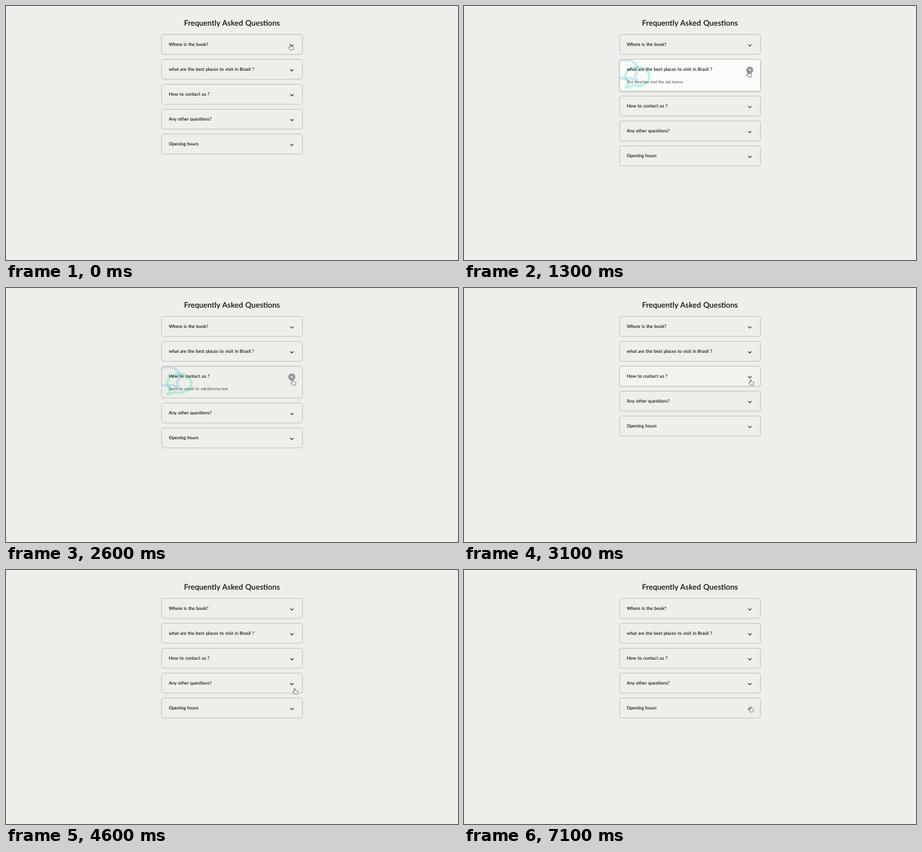
An HTML page that plays this animation: 690 by 388 pixels, repeating every 7.2 s.

```html
<!DOCTYPE html>
<html lang="en">
<head>
<meta charset="utf-8">
<title>Frequently Asked Questions</title>
<style>
  html, body { margin: 0; width: 100%; height: 100%; overflow: hidden; background: #eeefea; }
  svg { display: block; width: 100%; height: 100%; }
  text { font-family: Lato, "Open Sans", sans-serif; text-rendering: geometricPrecision; }
  .title { font-size: 11.7px; font-weight: 600; word-spacing: .6px; text-anchor: middle; fill: #0c0c0c; }
  .question { font-size: 6.95px; font-weight: 600; word-spacing: .35px; fill: #111; }
  .answer { font-size: 6.2px; word-spacing: .3px; fill: #4a4a4a; }
  .line { fill: none; stroke-linecap: round; stroke-linejoin: round; }
</style>
</head>
<body>
<svg id="stage" viewBox="0 0 690 388">
  <rect width="690" height="388" fill="#eeefea"/>
  <text class="title" x="345" y="29.6">Frequently Asked Questions</text>
  <g id="cards"></g>
  <g id="cursor" fill="#fff" stroke="#333" stroke-linejoin="round">
    <path id="arrow" stroke-width=".55" d="M0 0V6.2L1.4 5 2.3 7 3.2 6.6 2.3 4.7H4.2Z"/>
    <path id="hand" stroke-width=".65" d="M-.8 5.2V.8a.8.8 0 0 1 1.6 0V3.3q1.3-.5 1.5.3 1.2-.4 1.4.4 1.1-.2 1.1.8V6.3q0 1.2-.8 2.3H-.4Q-1.2 7.3-2.6 5.7q-.5-1 .5-1.1.7.1 1.3.8Z"/>
  </g>
</svg>
<script>
const LOOP = 7200, STEP = 100;
const LEFT = 237.4, TOP = 43.4, WIDTH = 215.3, PITCH = 38.05;
const CLOSED = 30.5, OPEN = 48.6, FADE_IN = 250, FADE_OUT = 160;

const items = [
  { q: 'Where is the book?', a: 'The book is on the table', open: 100, close: 740 },
  { q: 'what are the best places to visit in Brasil ?', a: 'The beaches and the old towns', open: 1100, close: 1800 },
  { q: 'How to contact us ?', a: 'Send an email to: ask@home.test', open: 2600, close: 3000 },
  { q: 'Any other questions?', a: 'No other questions', open: 4000, close: 4400 },
  { q: 'Opening hours', a: '24hrs', open: 5100, close: 6650 }
];

// Pointer stops: time, x, y, shape; it glides between them.
const stops = [
  [0, 434.2, 58.4, 'hand'], [700, 434.2, 58.4, 'hand'],
  [800, 433, 83.6, 'arrow'], [900, 434.2, 100.2, 'hand'],
  [1900, 434.2, 100.2, 'hand'], [2100, 435.5, 114, 'arrow'],
  [2200, 436.5, 125, 'hand'], [2400, 437.6, 139.8, 'hand'],
  [3100, 437.6, 139.8, 'hand'], [3200, 439.5, 153, 'arrow'],
  [3300, 441, 170, 'hand'], [3400, 441, 170, 'hand'],
  [3500, 441.2, 170.8, 'hand'], [4500, 441.2, 170.8, 'hand'],
  [4700, 440, 191, 'arrow'], [4800, 440, 191, 'arrow'],
  [4900, 438.6, 203, 'hand'], [5000, 438, 207.5, 'hand'],
  [5800, 438, 207.5, 'hand'], [5900, 440.2, 208.2, 'arrow'],
  [6100, 440.8, 208.4, 'arrow'], [6300, 440.8, 208.4, 'arrow'],
  [6400, 439.4, 208.4, 'hand'], [6500, 437.7, 208.3, 'hand'],
  [7000, 437.7, 208.3, 'hand'], [7100, 437.2, 208.3, 'hand'], [7200, 437.2, 208.3, 'hand']
];

const BUBBLE = 'M256 56C128 56 24 138 24 240C24 288 46 328 80 361C66 402 42 438 24 456C86 456 130 430 159 407C188 418 222 424 256 424C384 424 488 342 488 240S384 56 256 56Z';
const BUBBLE_SCALE = 0.0786;

const byId = id => document.getElementById(id);
const clamp = v => Math.min(1, Math.max(0, v));
const smooth = v => v * v * (3 - 2 * v);

function add(parent, tag, attrs, text) {
  const el = document.createElementNS('http://www.w3.org/2000/svg', tag);
  for (const name in attrs) el.setAttribute(name, attrs[name]);
  if (text) el.textContent = text;
  parent.append(el);
  return el;
}

const box = height => ({ x: LEFT, y: 0, width: WIDTH, height, rx: 3.4 });

function addBubble(parent, x, y, flip, color, opacity) {
  add(parent, 'path', {
    class: 'line', d: BUBBLE, stroke: color, 'stroke-width': 48, opacity,
    transform: `translate(${x} ${y}) scale(${flip * BUBBLE_SCALE} ${BUBBLE_SCALE})`
  });
}

function buildCard(item, i) {
  const g = item.group = add(byId('cards'), 'g', {});
  item.fill = add(g, 'rect', { ...box(CLOSED), fill: '#fdfefb' });

  const clip = add(g, 'clipPath', { id: 'clip' + i });
  add(clip, 'rect', box(OPEN));
  item.bubbles = add(g, 'g', { 'clip-path': `url(#clip${i})` });
  addBubble(item.bubbles, LEFT + 29.4, -3.6, -1, '#3498db', .22);
  addBubble(item.bubbles, LEFT + 7.2, 7.2, 1, '#2edfa5', .3);

  item.border = add(g, 'rect', { ...box(CLOSED), fill: 'none', stroke: '#b4b5b1', 'stroke-width': .75 });
  add(g, 'text', { class: 'question', x: 248.4, y: 17.8 }, item.q);
  item.answer = add(g, 'text', { class: 'answer', x: 248.4, y: 36.3 }, item.a);

  item.chevron = add(g, 'path', {
    class: 'line', d: 'M434 15.6L436.3 17.9 438.6 15.6', stroke: '#222', 'stroke-width': 1.05
  });
  item.cross = add(g, 'g', {});
  add(item.cross, 'circle', { cx: 436.2, cy: 16.4, r: 5.4, fill: '#92989b' });
  add(item.cross, 'path', {
    class: 'line', d: 'M434.7 14.9l3 3m0-3l-3 3', stroke: '#fff', 'stroke-width': .9
  });
}

function show(el, on) {
  el.setAttribute('visibility', on ? 'visible' : 'hidden');
}

function drawCards(t) {
  let shift = 0;
  items.forEach((item, i) => {
    const open = t >= item.open && t < item.close;
    const height = open ? OPEN : CLOSED;
    const rise = smooth(clamp((t - item.open) / FADE_IN));
    const fall = smooth(clamp((t - item.close) / FADE_OUT));
    const glow = rise * (1 - fall);

    item.group.setAttribute('transform', `translate(0 ${TOP + i * PITCH + shift})`);
    item.fill.setAttribute('height', height);
    item.border.setAttribute('height', height);
    item.fill.setAttribute('opacity', glow);
    item.fill.style.filter = glow ? 'drop-shadow(0 1.1px 1.1px rgba(0,0,0,.26))' : 'none';
    for (const part of [item.bubbles, item.answer, item.cross]) show(part, open);
    show(item.chevron, !open);
    if (open) shift += OPEN - CLOSED;
  });
}

function drawCursor(t) {
  const next = stops.findIndex(stop => stop[0] > t);
  const [t0, x0, y0, shape] = stops[next - 1];
  const [t1, x1, y1] = stops[next];
  const k = (t - t0) / (t1 - t0);
  byId('cursor').setAttribute('transform', `translate(${x0 + (x1 - x0) * k} ${y0 + (y1 - y0) * k})`);
  show(byId('hand'), shape === 'hand');
  show(byId('arrow'), shape === 'arrow');
}

function render(ms) {
  const t = Math.floor(ms % LOOP / STEP) * STEP;
  drawCards(t);
  drawCursor(t);
}

items.forEach(buildCard);
const start = performance.now();
function tick() {
  render(performance.now() - start);
  requestAnimationFrame(tick);
}
tick();
</script>
</body>
</html>
```
